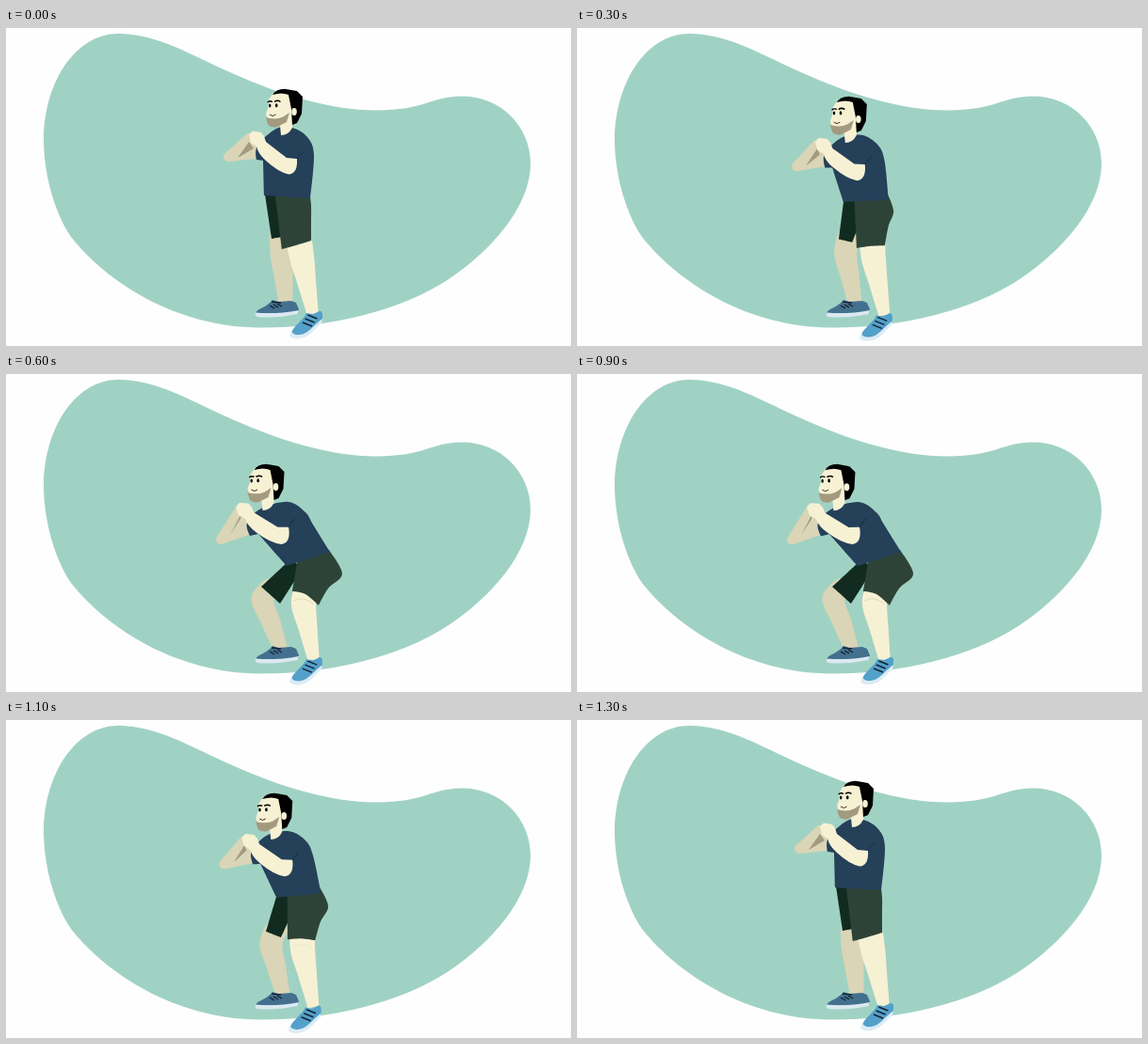
These frames come from a looping animation (600 px wide and 338 px high, 1400 ms). An HTML page with a canvas:

```html
<!DOCTYPE html>
<html lang="en">
<head>
<meta charset="utf-8">
<title>Squat</title>
<style>
html, body { margin: 0; width: 100%; height: 100%; overflow: hidden; background: #fefefe; }
canvas { display: block; width: 100%; height: 100%; }
</style>
</head>
<body>
<canvas id="stage" width="600" height="338"></canvas>
<script>
const ctx = document.getElementById('stage').getContext('2d');
const LOOP = 1400, STEP = 100;
const SKIN = '#f7f1d4', SHADE = '#dad5b6', BEARD = '#a39a80', SHIRT = '#254059', INK = '#14202c';

const blob = new Path2D('M119 6C160 6 195 28 240 48C289 70 344 87.5 393 87.5C445 87.5 452 72.5 484 72.5C526 72.5 557 105 557 144C557 190 515 237 470 267C418 301 345 318.5 270 318.5C180 318 107 270 69 222C49 192 40 150 40 118C41 54 76 6 119 6Z');
const face = new Path2D('M284 69L279 76L278.5 84L276 91L278 98L291 104L292 114Q300 114 304 106L304 97L306 70Z');
const beard = new Path2D('M276 95L278 102Q280 106 287 105.5L298 100L301 90L294 94.5Q286 98 276 95Z');
const hair = new Path2D('M283 71Q286 65 296 64.7L309 67L315 73L314 91L309 101L304 103L303 86L300 71Q293 68 283 71Z');
const frontArm = new Path2D('M258 113L262 109.5L271 111L274 115L276 121L298 138L309 139Q310 155 300 155.5Q289 153 276 141Q268 134 266 126L260 122Z');
const backShoe = new Path2D('M265 303C267 298 277 297 283 289L289 291L303 290L308 292L311 299L310 303Z');
const backSole = new Path2D('M265 302.5Q285 305 311 300L309.5 304Q285 309 267 307Q264 306 265 302.5Z');
const frontShoe = new Path2D('M319 303C316 311 304 317 303 325L312 327C322 326 329 316 336 311L336 303Q334 299 331 302L326 304Z');
const frontSole = new Path2D('M303 322L301 327Q304 331 312 330C322 329 327 321 335.5 313L336 309C328 314 322 325 312 326Q305 327 303 322Z');

let p = 0;  // squat depth, 0 standing to 1 down

const ease = (t, a, b) => (1 - Math.cos(Math.PI * Math.min(1, Math.max(0, (t - a) / (b - a))))) / 2;
const depth = t => (ease(t, 110, 680) - ease(t, 840, 1300)) / 0.954;

// Joints travel on an arc: sideways motion leads the drop.
const joint = (x, y, dx, dy, corner) =>
  ({ x: x + dx * (p + 0.55 * p * (1 - p)), y: y + dy * p, corner });

const mix = (a, b, k) => ({ x: a.x + (b.x - a.x) * k, y: a.y + (b.y - a.y) * k });

function fill(path, color) {
  ctx.fillStyle = color;
  ctx.fill(path);
}

// Closed spline through the points, sharp at corners.
function outline(pts, color) {
  const n = pts.length, next = i => pts[(i + 1) % n], prev = i => pts[(i + n - 1) % n];
  const slope = (i, k) => pts[i].corner ? 0 : (next(i)[k] - prev(i)[k]) / 6;
  const path = new Path2D();
  path.moveTo(pts[0].x, pts[0].y);
  pts.forEach((a, i) => {
    const j = (i + 1) % n, b = pts[j];
    path.bezierCurveTo(a.x + slope(i, 'x'), a.y + slope(i, 'y'),
      b.x - slope(j, 'x'), b.y - slope(j, 'y'), b.x, b.y);
  });
  fill(path, color);
}

// Tapered leg around a line of joints.
function leg(hip, knee, ankle, [rHip, rKnee, rCalf, rAnkle], color) {
  const bones = [hip, knee, mix(knee, ankle, 0.43), ankle];
  const radii = [rHip, rKnee, rCalf, rAnkle];
  const side = sign => bones.map((b, i) => {
    const u = bones[Math.max(0, i - 1)], v = bones[Math.min(3, i + 1)];
    const k = sign * radii[i] / Math.hypot(v.x - u.x, v.y - u.y);
    return { x: b.x - (v.y - u.y) * k, y: b.y + (v.x - u.x) * k, corner: i === 3 };
  });
  outline([...side(1), ...side(-1).reverse()], color);
}

function line(x1, y1, x2, y2, width, color = INK, bend = 0) {
  ctx.beginPath();
  ctx.moveTo(x1, y1);
  ctx.quadraticCurveTo((x1 + x2) / 2, (y1 + y2) / 2 + bend, x2, y2);
  ctx.strokeStyle = color;
  ctx.lineWidth = width;
  ctx.stroke();
}

function dot(x, y, rx, ry) {
  ctx.beginPath();
  ctx.ellipse(x, y, rx, ry, 0, 0, 2 * Math.PI);
  ctx.fill();
}

function shifted(x, y, paint) {
  ctx.save();
  ctx.translate(x, y);
  paint();
  ctx.restore();
}

function drawBackShoe() {
  fill(backShoe, '#43708f');
  fill(backSole, '#dbe9f1');
  for (let i = 0; i < 3; i++) line(280 + 4 * i, 295 - i, 285 + 4 * i, 298 - i, 1.3);
  line(282, 291, 292, 292, 1.3);
}

function drawFrontShoe() {
  fill(frontShoe, '#53a0cb');
  fill(frontSole, '#dcecf5');
  for (let i = 0; i < 3; i++) line(315 + 2.7 * i, 313 - 4 * i, 325 + 2.7 * i, 317 - 4 * i, 1.4);
}

function drawShorts() {
  outline([
    joint(274, 170, 27, 28, true), joint(282, 224, -11, 2, true),
    joint(293, 222, -2, 22, true), joint(304, 180, 12, 25, true)
  ], '#112b20');
}

function drawFrontShorts() {
  outline([
    joint(285, 170, 25, 25, true), joint(293, 235, 11, -4, true), joint(308, 231, 10, 3),
    joint(324, 226, 8, 20, true), joint(324, 205, 18, 23), joint(324, 188, 33, 24),
    joint(322, 172, 20, 14, true)
  ], '#2e4337');
}

function drawBackArm() {
  const arm = new Path2D();
  for (const j of [joint(258, 117, -11, 29), joint(236, 137, -8, 39), joint(264, 134, -7, 32)]) arm.lineTo(j.x, j.y);
  arm.closePath();
  fill(arm, SHADE);
  ctx.strokeStyle = SHADE;
  ctx.lineWidth = 10;
  ctx.stroke(arm);
  outline([
    joint(258, 121, -8, 27, true), joint(246, 138, -8, 33, true), joint(263, 128, -14, 26, true)
  ], BEARD);
}

function drawShirt() {
  outline([
    joint(287, 107, -16, 36), joint(267, 125, -11, 33), joint(266, 140, -7, 32, true),
    joint(273, 141, -5, 29, true), joint(274, 178, 24, 26, true), joint(323, 181, 21, 8, true),
    joint(327, 135, -1, 25), joint(320, 116, -2, 31), joint(304, 106, -4, 30)
  ], SHIRT);
}

function drawHead() {
  fill(face, SKIN);
  fill(beard, BEARD);
  fill(hair, '#000');
  ctx.fillStyle = SKIN;
  dot(306, 89, 2.8, 4);
  ctx.fillStyle = '#000';
  dot(280.2, 82.5, 1.2, 2);
  dot(287.2, 82.3, 1.3, 2.1);
  line(277.8, 79, 283, 78.5, 1.4, '#000', -2);
  line(285, 78.5, 291.5, 78.5, 1.5, '#000', -2.5);
  line(280, 92, 286.5, 92, 1, '#3a2b22', 3);
}

// The forearm turns and stretches with its hand and elbow.
function drawFrontArm() {
  const hand = joint(265, 115, -13.5, 27.5), elbow = joint(302, 150, -8, 25);
  const dx = elbow.x - hand.x, dy = elbow.y - hand.y;
  ctx.save();
  ctx.translate(hand.x, hand.y);
  ctx.rotate(Math.atan2(dy, dx) - Math.atan2(35, 37));
  const size = Math.hypot(dx, dy) / Math.hypot(35, 37);
  ctx.scale(size, size);
  ctx.translate(-265, -115);
  fill(frontArm, SKIN);
  line(309, 139, 316, 131, 1, '#1a2f45');
  ctx.restore();
}

function draw() {
  ctx.lineJoin = 'round';
  ctx.fillStyle = '#fefefe';
  ctx.fillRect(0, 0, 600, 338);
  fill(blob, '#a0d2c4');

  leg(joint(293, 212, -6, 12), joint(292.5, 238, -20, 1), joint(297.5, 296, -4.5, 0), [10, 12, 10, 7], SHADE);
  drawBackShoe();
  drawShorts();

  leg(joint(311, 224, 8, 6), joint(314, 243, 2, 2), joint(326, 305, 1, 0), [11, 13, 10, 6], SKIN);
  ctx.globalAlpha = Math.min(1, Math.max(0, p));
  line(305, 241, 327, 245, 1, '#e3dcba', -8);
  ctx.globalAlpha = 1;
  const dip = 2.8 * Math.sqrt(Math.max(0, Math.sin(Math.PI * p)));
  shifted(-dip / 2, dip, drawFrontShoe);
  drawFrontShorts();

  drawBackArm();
  drawShirt();
  const head = joint(0, 0, -19.5, 31);
  shifted(head.x, head.y, drawHead);
  drawFrontArm();
}

function tick() {
  const t = performance.now() % LOOP;
  p = depth(Math.floor(t / STEP) * STEP);
  draw();
  requestAnimationFrame(tick);
}
tick();
</script>
</body>
</html>
```
